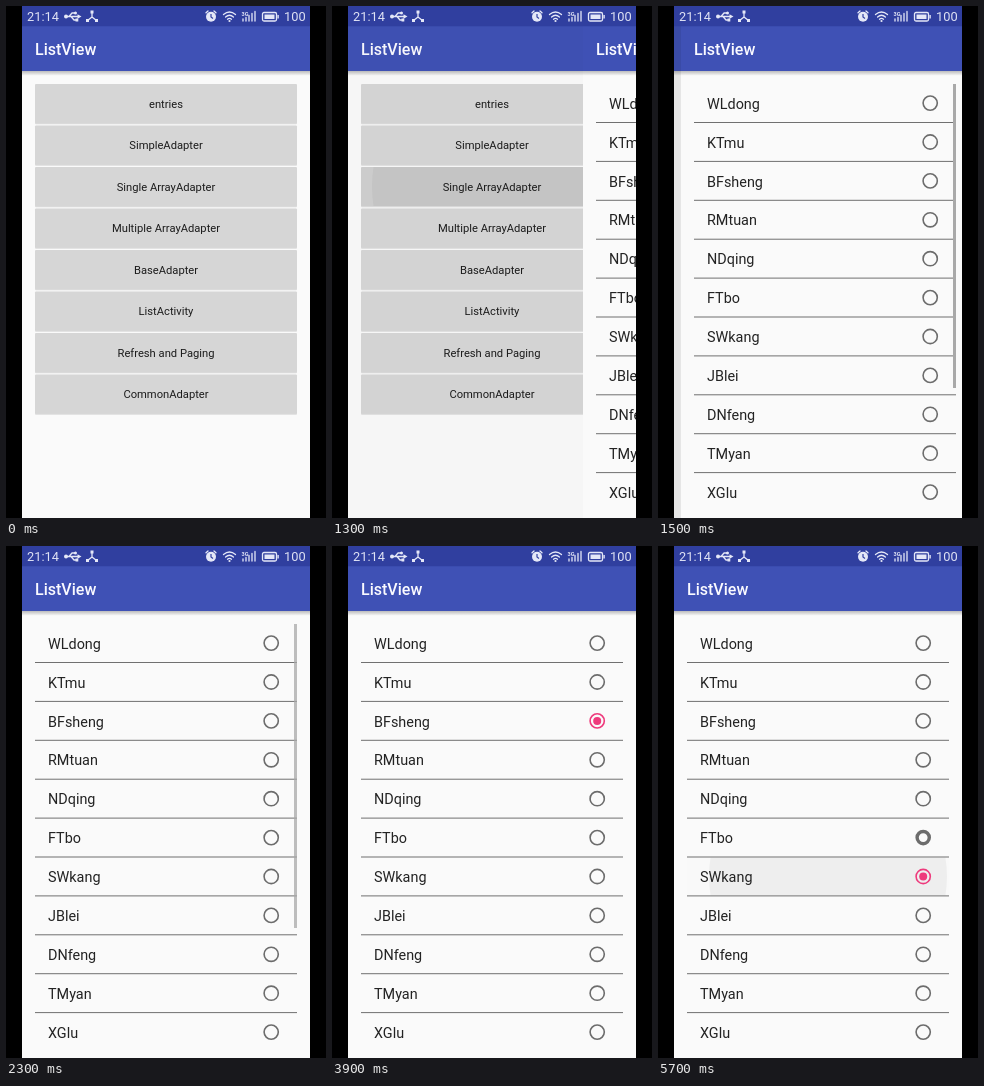
Recreate the animation shown at these times as an HTML page. Size 320x512 px, loop 5800 ms.

```html
<!DOCTYPE html>
<html lang="en">
<head>
<meta charset="utf-8">
<title>List demo</title>
<style>
  html, body { margin: 0; width: 100%; height: 100%; overflow: hidden; background: #000; }
  svg { display: block; width: 100vw; height: 100vh; font-family: Roboto, "Noto Sans", sans-serif; }
  .title { font-size: 16px; font-weight: 500; fill: #fafaff; }
  .label { font-size: 11.2px; fill: #1c1c1c; text-anchor: middle; }
  .name { font-size: 14.4px; fill: #232323; }
  .status { font-size: 12.8px; fill: #dfe2f4; }
  .line { fill: none; stroke: #e4e7f7; stroke-width: 1.3; stroke-linecap: round; stroke-linejoin: round; }
  .solid { fill: #e4e7f7; }
</style>
</head>
<body>
<svg viewBox="0 0 320 512">
  <defs>
    <linearGradient id="shade" x2="0" y2="1">
      <stop offset="0" stop-color="#000" stop-opacity=".26"/>
      <stop offset="1" stop-color="#000" stop-opacity="0"/>
    </linearGradient>
    <clipPath id="screen"><rect x="16" width="288" height="512"/></clipPath>
    <clipPath id="buttonClip"><rect x="29" y="161" width="262" height="39"/></clipPath>
    <clipPath id="rowClip"><rect id="rowBox" x="29" width="262" height="38"/></clipPath>
  </defs>
  <rect width="320" height="512"/>
  <g clip-path="url(#screen)">
    <g id="menu"></g>
    <rect id="dim" x="16" y="20" width="288" height="492"/>
    <g id="list"></g>
    <rect x="16" width="288" height="20.3" fill="#303f9f"/>
    <g id="bar">
      <text class="status" x="21" y="15">21:14</text>
      <text class="status" x="278" y="15">100</text>
      <path class="line" d="M60 10.5H72M63 10.5L66 7H69M65 10.5L68 14H70"/>
      <circle class="solid" cx="60" cy="10.5" r="2"/>
      <path class="solid" d="M71.5 8.3L75.5 10.5L71.5 12.7ZM69.5 12.6H72.3V15.4H69.5Z"/>
      <circle class="solid" cx="69.5" cy="7" r="1.5"/>
      <path class="line" d="M86 6V11L81.5 14.5M86 11L90.5 14.5"/>
      <path class="solid" d="M84.5 4.5H87.5V7.5H84.5ZM80 13H83V16H80ZM89 13H92V16H89Z"/>
      <circle class="solid" cx="205" cy="10.8" r="5"/>
      <path class="line" d="M200 6.8L202 5M210 6.8L208 5"/>
      <path d="M205 8V11L207 12.4" fill="none" stroke="#303f9f" stroke-width="1.2"/>
      <path class="line" d="M217.5 8.5Q223.5 3.5 229.5 8.5M219.6 11Q223.5 7.6 227.4 11M221.5 13.2Q223.5 11.6 225.5 13.2"/>
      <circle class="solid" cx="223.5" cy="15" r="1.1"/>
      <text class="solid" x="235.5" y="9.5" font-size="5.5" font-weight="700">3G</text>
      <path class="line" d="M237 15V13M240 15V11.5M243 15V9.5M246 15V7.5M249 15V5.5"/>
      <rect class="line" x="256.5" y="6.5" width="14" height="8.5" rx="1.5"/>
      <path class="solid" d="M258.5 8.5H268.5V13H258.5ZM271.4 9H272.8V12.5H271.4Z"/>
    </g>
  </g>
</svg>
<script>
const LOOP = 5800, STEP = 100;
const ROW = 38.9, BUTTON = 41.5;
const labels = ["entries", "SimpleAdapter", "Single ArrayAdapter", "Multiple ArrayAdapter",
  "BaseAdapter", "ListActivity", "Refresh and Paging", "CommonAdapter"];
const names = ["WLdong", "KTmu", "BFsheng", "RMtuan", "NDqing", "FTbo",
  "SWkang", "JBlei", "DNfeng", "TMyan", "XGlu"];

const taps = [[2600, 1], [3400, 2], [4100, 3], [4900, 5], [5600, 6]];
// background alpha, wave radius, wave alpha
const tapSteps = [[.022, 0, 0], [.004, 119, .042], [.004, 155, .035], [0, 180, .015]];
const pressSteps = [[.015, 12, .03], [.03, 42, .04], [.03, 72, .04], [.03, 102, .04], [.03, 130, .04]];
const slideSteps = [235, 72, 7, 1.5, 0];
const fadeSteps = [.75, .35, 0];

const $ = id => document.getElementById(id);

function add(parent, tag, attrs, text) {
  const el = document.createElementNS("http://www.w3.org/2000/svg", tag);
  set(el, attrs);
  if (text) el.textContent = text;
  parent.append(el);
  return el;
}

function set(el, attrs) {
  for (const key in attrs) el.setAttribute(key, attrs[key]);
}

function rect(parent, x, y, width, height, fill, extra) {
  return add(parent, "rect", { x, y, width, height, fill, ...extra });
}

function page(parent) {
  rect(parent, 16, 0, 288, 512, "#fafafa");
  rect(parent, 16, 64.8, 288, 5, "url(#shade)");
  rect(parent, 16, 0, 288, 65, "#3f51b5");
  add(parent, "text", { class: "title", x: 29, y: 49 }, "ListView");
}

function ripple(parent, clip, y, height) {
  const g = add(parent, "g", { "clip-path": `url(#${clip})` });
  const back = rect(g, 29, y, 262, height, "#000");
  const wave = add(g, "circle", { cx: 170, cy: y + height / 2 });
  return ([alpha, r, waveAlpha] = [0, 0, 0], top = y) => {
    set(back, { y: top, "fill-opacity": alpha });
    set(wave, { cy: top + height / 2, r, "fill-opacity": waveAlpha });
  };
}

const menu = $("menu"), list = $("list");

page(menu);
labels.forEach((_, i) => {
  const y = 78 + BUTTON * i;
  rect(menu, 29, y + 1, 262, 39.2, "#000", { "fill-opacity": .13, rx: 1 });
  rect(menu, 29, y, 262, 39, "#d6d6d6", { rx: 1 });
});
const press = ripple(menu, "buttonClip", 161, 39);
labels.forEach((label, i) =>
  add(menu, "text", { class: "label", x: 160, y: 101.6 + BUTTON * i }, label));

page(list);
const tapRipple = ripple(list, "rowClip", 117, 38);
const radios = names.map((name, i) => {
  const y = ROW * i;
  add(list, "text", { class: "name", x: 42, y: 102.7 + y }, name);
  if (i < names.length - 1) rect(list, 29, 116 + y, 262, 1, "#707070");
  const at = { cx: 265.2, cy: 97.1 + y };
  return {
    ring: add(list, "circle", { ...at, fill: "none" }),
    dot: add(list, "circle", { ...at, r: 4, fill: "#ee3a7c" })
  };
});
const scrollbar = rect(list, 288, 78, 3, 304, "#a9a9a9");

function draw(time) {
  const t = Math.floor(time % LOOP / STEP) * STEP;
  const index = start => (t - start) / STEP;

  press(pressSteps[Math.min(index(900), pressSteps.length - 1)]);

  const x = t < 1300 ? 288 : slideSteps[index(1300)] ?? 0;
  list.setAttribute("transform", `translate(${x})`);
  $("dim").setAttribute("fill-opacity", .08 * (1 - x / 288));
  scrollbar.setAttribute("opacity", t < 2300 ? 1 : fadeSteps[index(2300)] ?? 0);

  let chosen = -1, leaving = -1, wave, top = 117;
  taps.forEach(([start, row], i) => {
    if (t < start) return;
    wave = tapSteps[index(start)];
    top = 78 + ROW * row;
    if (t < start + STEP) return;
    chosen = row;
    leaving = t < start + 2 * STEP && i ? taps[i - 1][1] : -1;
  });
  $("rowBox").setAttribute("y", top);
  tapRipple(wave, top);

  radios.forEach(({ ring, dot }, i) => {
    const thick = i === leaving;
    set(ring, {
      r: thick ? 6.1 : 7.1,
      stroke: i === chosen ? "#ee3a7c" : "#6c6c6c",
      "stroke-width": thick ? 3.4 : 1.6
    });
    dot.setAttribute("opacity", i === chosen ? 1 : 0);
  });
}

const began = performance.now();
function tick() {
  draw(performance.now() - began);
  requestAnimationFrame(tick);
}
tick();
</script>
</body>
</html>
```
